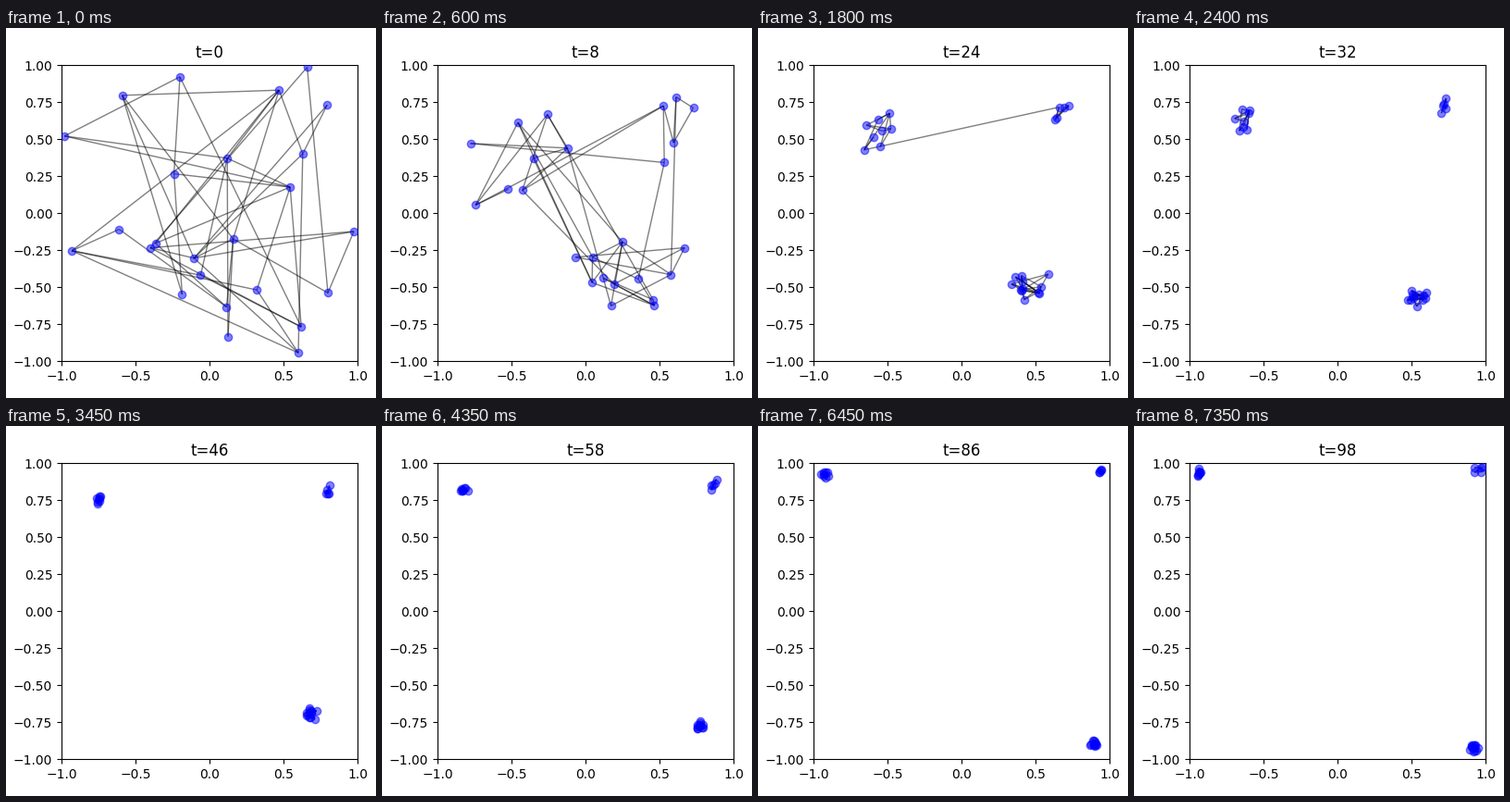
These frames come from a looping animation (400x400 px, 7.5 s). A matplotlib script:

```python
import matplotlib.pyplot as plt
import numpy as np
from matplotlib.animation import FuncAnimation
from matplotlib.collections import LineCollection

FRAMES, STEP = 50, 2
rng = np.random.default_rng(12)

# Opening opinions, grouped by the corner each agent ends up in.
upper_left = [(-.98, .52), (-.59, .795), (-.20, .92), (.12, .37),
              (-.24, .265), (-.61, -.11), (-.93, -.255), (-.365, -.205)]
upper_right = [(.47, .83), (.66, .985), (.795, .73), (.63, .40), (.545, .175)]
lower_right = [(-.40, -.235), (-.105, -.305), (-.06, -.42), (.16, -.175),
               (-.185, -.55), (.115, -.635), (.32, -.52), (.80, -.54),
               (.975, -.125), (.62, -.77), (.60, -.945), (.125, -.835)]
camps = upper_left, upper_right, lower_right
start = np.array(sum(camps, []))
n = len(start)
camp = np.repeat([0, 1, 2], [len(c) for c in camps])
corner = np.array([(-1, 1), (1, 1), (1, -1)])[camp]
lag = np.array([1.05, .8, 1.3])[camp, None]

# Jitter that wanders smoothly from frame to frame.
noise = rng.standard_normal((FRAMES, n, 2))
for k in range(1, FRAMES):
    noise[k] = .8 * noise[k - 1] + .6 * noise[k]


def make_links():
    """Two links per agent; each later switches to a partner in its own camp."""
    links = []
    for a in np.repeat(np.arange(n), 2):
        others = np.delete(np.arange(n), a)
        mates = others[camp[others] == camp[a]]
        switch = 36 * rng.random() ** 2.5
        links.append((a, rng.choice(others), rng.choice(mates), switch))
    return links


links = make_links()


def drift(t):
    return corner * (1 - lag * np.exp(-t / 34))


def positions(t):
    """Opinions contract onto their camp while the camp drifts to its corner."""
    pull = np.exp(-t / 13)
    spread = (1 - np.exp(-t / 6)) * (.015 + .06 * pull)
    p = drift(t) + (start - drift(0)) * pull + spread * noise[t // STEP]
    return np.clip(p, -.985, .985)


fig = plt.figure(figsize=(4, 4), dpi=100)
ax = fig.add_axes([.15, .1, .8, .8])
ax.set(xlim=(-1, 1), ylim=(-1, 1), xticks=np.linspace(-1, 1, 5))
title = ax.set_title("t=0")
edges = LineCollection([], colors="k", linewidths=1, alpha=.5, zorder=2)
ax.add_collection(edges)
dots, = ax.plot([], [], "bo", alpha=.5, zorder=3)


def draw(k):
    t = k * STEP
    p = positions(t)
    live = {tuple(sorted((a, b if t < switch else mate)))
            for a, b, mate, switch in links}
    edges.set_segments([p[list(pair)] for pair in sorted(live)])
    dots.set_data(p[:, 0], p[:, 1])
    title.set_text(f"t={t}")
    return edges, dots, title


anim = FuncAnimation(fig, draw, frames=FRAMES, interval=150, repeat=True,
                     repeat_delay=0)
plt.show()
```
